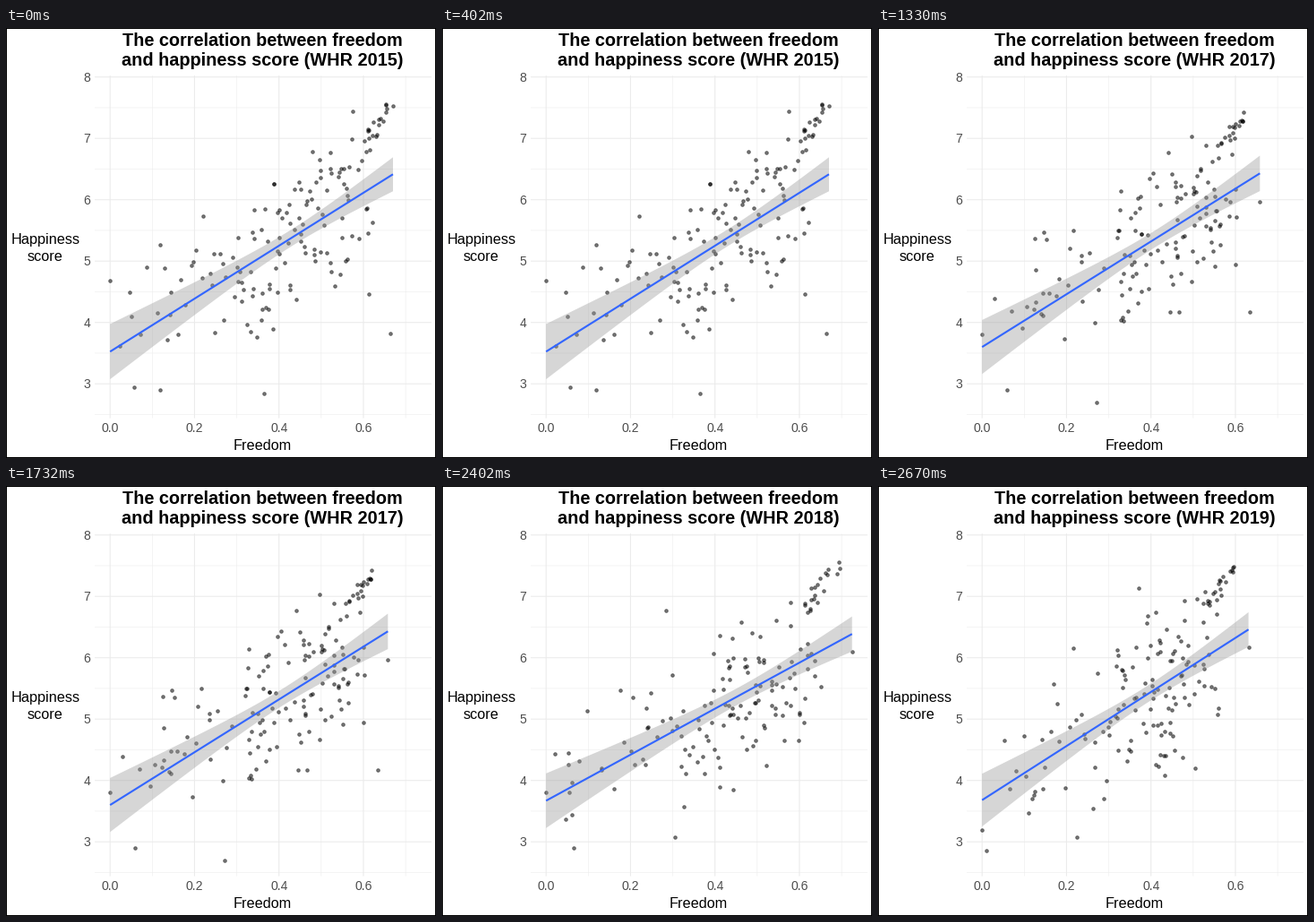
These frames come from a looping animation (480 by 480 pixels, 3.33 s). A matplotlib script:

```python
import numpy as np
import matplotlib.pyplot as plt
from matplotlib.animation import FuncAnimation
from matplotlib.collections import LineCollection
from matplotlib.patches import Polygon, Rectangle

SIZE, DPI = 480, 72          # at 72 dpi one point is one pixel
LEFT, RIGHT, TOP, BOTTOM = 99, 475, 53, 435.5
STEP, LOOP = 10, 3330        # ms
NARROW = 0.137               # half-width of the band at the mean
plt.rcParams["font.family"] = "Liberation Sans"

# year, countries, fit at both ends, band half-width at 0, mean freedom,
# freedom of the happiest countries, extreme countries (the second ends the fit)
YEARS = [
    (2015, 158, 3.525, 6.415, 0.450, 0.429, 0.665,
     [(0, 4.68), (0.67, 7.53), (0.118, 2.90), (0.365, 2.84), (0.663, 3.82)]),
    (2016, 157, 3.740, 6.440, 0.415, 0.371, 0.590,
     [(0, 4.14), (0.608, 5.99), (0.044, 2.90), (0.365, 7.27), (0.543, 3.51)]),
    (2017, 155, 3.600, 6.430, 0.440, 0.409, 0.635,
     [(0, 3.80), (0.658, 5.97), (0.06, 2.90), (0.271, 2.69), (0.634, 4.17)]),
    (2018, 156, 3.670, 6.387, 0.445, 0.455, 0.685,
     [(0, 3.80), (0.7246, 6.10), (0.066, 2.90), (0.305, 3.08), (0.284, 6.77)]),
    (2019, 156, 3.680, 6.460, 0.430, 0.393, 0.600,
     [(0, 3.20), (0.631, 6.17), (0.01, 2.85), (0.225, 3.08), (0.371, 7.14)]),
]


def px(v):
    return 116.2 + 471.3 * v


def py(v):
    return 54.7 + 68.5 * (8 - v)


def stage(x, y):
    return np.column_stack([px(x), py(y)])


def cloud(year, count, fit, tip, extremes):
    """A sparse left tail, a happy upper corner and a wide core."""
    rng = np.random.default_rng(year)
    n_tail, n_top = 23, 18
    n_core = count - n_tail - n_top - len(extremes)

    tail = rng.uniform(0.02, 0.25, n_tail)
    tail_y = fit(tail) + rng.triangular(-1.1, 0.1, 1.6, n_tail)

    t = rng.random(n_top)
    top = tip - 0.07 * (1 - t) + rng.normal(0, 0.008, n_top)
    top_y = 6.85 + 0.7 * t + rng.normal(0, 0.07, n_top)

    core = 0.24 + (tip - 0.27) * rng.beta(1.6, 1.3, n_core)
    core_y = fit(core) + rng.triangular(-1.75, 0, 1.5, n_core)

    far_x, far_y = np.transpose(extremes)
    return stage(np.concatenate([far_x, tail, top, core]),
                 np.concatenate([far_y, tail_y, top_y, core_y]))


def band(end, fit, half, mean):
    x = np.linspace(0, end, 80)
    growth = (half**2 - NARROW**2) / mean**2
    h = np.sqrt(NARROW**2 + growth * (x - mean)**2)
    upper, lower = stage(x, fit(x) + h), stage(x, fit(x) - h)
    return np.vstack([upper, lower[::-1]])


def scene(year, count, y0, y1, half, mean, tip, extremes):
    end = extremes[1][0]

    def fit(x):
        return y0 + (y1 - y0) * x / end

    ends = np.array([0, end])
    return (year, cloud(year, count, fit, tip, extremes),
            band(end, fit, half, mean), stage(ends, fit(ends)))


scenes = [scene(*row) for row in YEARS]

fig = plt.figure(figsize=(SIZE / DPI, SIZE / DPI), dpi=DPI, facecolor="white")
ax = fig.add_axes([0, 0, 1, 1])
ax.set_xlim(0, SIZE)
ax.set_ylim(SIZE, 0)
ax.axis("off")


def label(x, y, s, size, color="black", ha="center", **kw):
    return ax.text(x, y, s, fontsize=size, color=color, ha=ha,
                   va="baseline", **kw)


def grid(xs, ys, width):
    lines = [[(px(x), TOP), (px(x), BOTTOM)] for x in xs]
    lines += [[(LEFT, py(y)), (RIGHT, py(y))] for y in ys]
    ax.add_collection(LineCollection(lines, colors="#EBEBEB",
                                     linewidths=width, zorder=1, snap=False))


grid(np.arange(0.1, 0.8, 0.2), np.arange(2.5, 8), 0.53)
grid(np.arange(0, 0.7, 0.2), range(3, 9), 1.07)

for v in np.arange(0, 0.7, 0.2):
    label(px(v), 451, f"{v:.1f}", 14, "#4D4D4D")
for v in range(3, 9):
    label(94, py(v) + 5, str(v), 14, "#4D4D4D", ha="right")
label(286.5, 471, "Freedom", 16.2)
label(44, 241, "Happiness", 16.2)
label(44, 260, "score", 16.2)
label(286.6, 20, "The correlation between freedom", 19.9, weight="bold")
title = label(286.6, 42, "", 19.9, weight="bold")

dots = ax.scatter([], [], s=3.55**2, facecolors=(0, 0, 0, 0.5),
                  edgecolors=(0, 0, 0, 0.5), linewidths=1, zorder=2)
dots.set_snap(False)
ribbon = ax.add_patch(Polygon([(0, 0), (0, 1), (1, 1)], facecolor="#999999",
                              alpha=0.4, lw=0, zorder=3))
line, = ax.plot([], [], color="#3366FF", lw=2.13, solid_capstyle="butt",
                zorder=4)
ax.add_patch(Rectangle((0, 0), SIZE, SIZE, fill=False, ec="black", lw=2,
                       snap=False, zorder=5))


def draw(i):
    # each year holds a fifth of the loop, rounded to whole steps
    ms = i * STEP
    k = sum(ms >= round(n * LOOP / 5, -1) for n in range(1, 5))
    year, pts, area, ends = scenes[k]
    title.set_text(f"and happiness score (WHR {year})")
    dots.set_offsets(pts)
    ribbon.set_xy(area)
    line.set_data(*ends.T)
    return title, dots, ribbon, line


anim = FuncAnimation(fig, draw, frames=LOOP // STEP, interval=STEP,
                     repeat=True, repeat_delay=0, blit=False)
plt.show()
```
